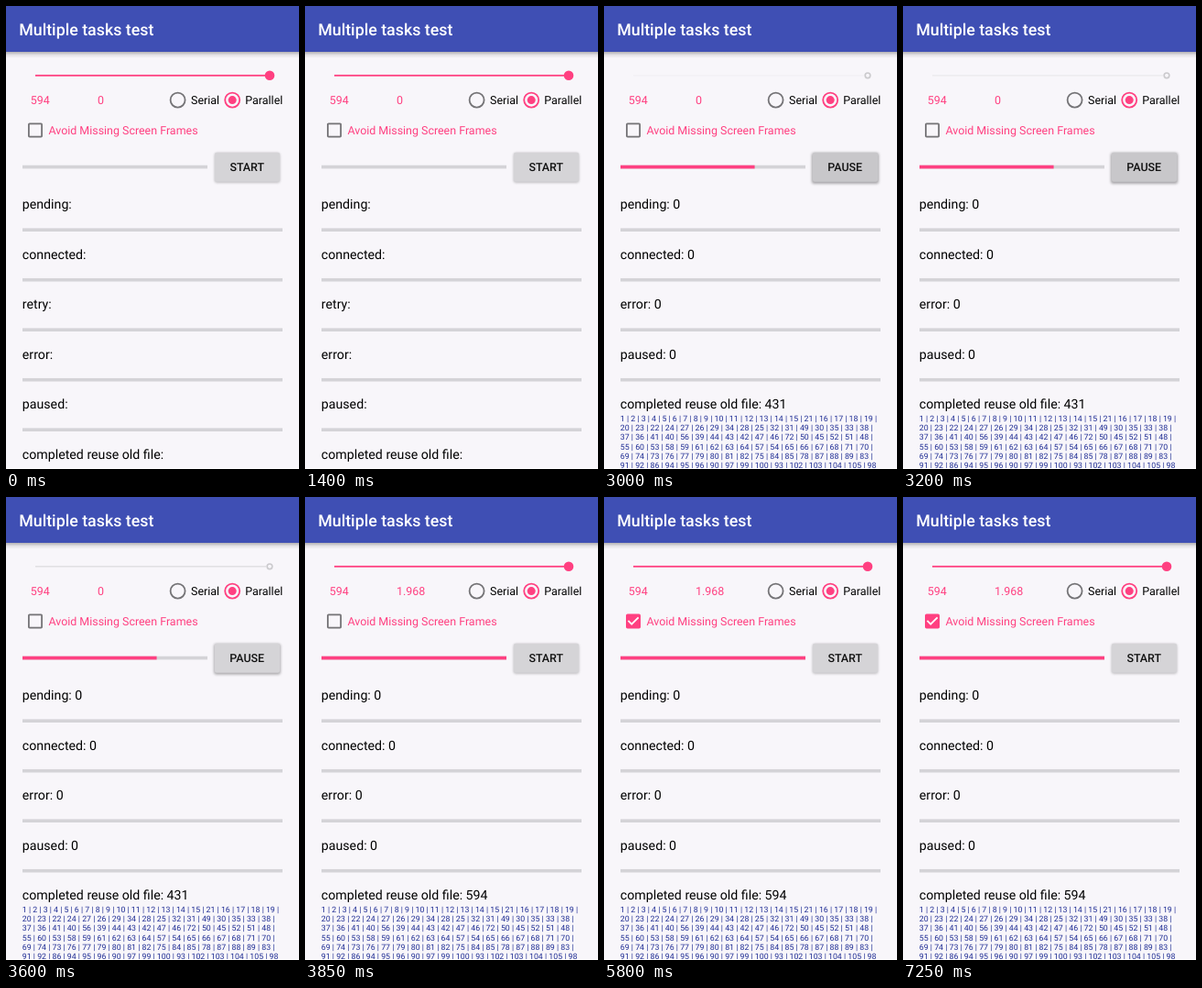
Recreate the animation shown at these times as an HTML page. Size 320 by 505 pixels, loop 8000 ms.

```html
<!DOCTYPE html>
<html lang="en">
<head>
<meta charset="utf-8">
<title>Multiple tasks test</title>
<style>
html, body { margin: 0; width: 100%; height: 100%; overflow: hidden; background: #f8f6fa; }
svg { display: block; width: 100vw; height: 100vh; }
text { font-family: Roboto, sans-serif; white-space: pre; text-rendering: geometricPrecision; }
.label { font-size: 14.2px; }
.small { font-size: 12.44px; }
.pink { fill: #ff4081; }
.list { font-size: 8.77px; fill: #1f2d94; }
.medium { font-weight: 500; }
</style>
</head>
<body>
<svg id="stage" viewBox="0 0 320 505" preserveAspectRatio="none">
  <defs>
    <linearGradient id="fade" x1="0" y1="0" x2="0" y2="1">
      <stop offset="0" stop-color="#000" stop-opacity=".28"/>
      <stop offset=".5" stop-color="#000" stop-opacity=".08"/>
      <stop offset="1" stop-color="#000" stop-opacity="0"/>
    </linearGradient>
    <filter id="blur" x="-20%" y="-30%" width="140%" height="160%"><feGaussianBlur stdDeviation="1.5"/></filter>
  </defs>
  <rect width="320" height="505" fill="#f8f6fa"/>
  <rect y="50" width="320" height="7" fill="url(#fade)"/>
  <rect width="320" height="50" fill="#3f4fb4"/>
  <text class="medium" x="14.2" y="32" font-size="17.8" fill="#fff">Multiple tasks test</text>

  <g id="sliderOn" class="pink">
    <rect x="32" y="74.9" width="256" height="1.8"/>
    <circle cx="288" cy="75.8" r="5.3"/>
  </g>
  <g id="sliderOff">
    <rect id="track" x="32" y="75" width="252" height="1.6" fill="#dcdbde"/>
    <circle cx="288" cy="75.8" r="2.8" fill="#f8f6fa" stroke="#cbcacd" stroke-width="1.7"/>
  </g>

  <text class="small pink" x="26.7" y="107.4">594</text>
  <text id="secs" class="small pink" x="100" y="107.4">0</text>
  <g fill="none" stroke-width="1.8">
    <circle cx="187.6" cy="102.6" r="8" stroke="#757477"/>
    <circle cx="247.2" cy="102.6" r="8" stroke="#ff4081"/>
  </g>
  <circle class="pink" cx="247.2" cy="102.6" r="4.5"/>
  <text class="small" x="202" y="107.4">Serial</text>
  <text class="small" x="261.3" y="107.4">Parallel</text>

  <circle id="ripple" cx="32" cy="135.5" r="0"/>
  <rect id="box" x="24" y="127.5" width="16" height="16" rx="1.8"/>
  <rect id="hole" fill="#f8f6fa"/>
  <path id="tick" d="M26.4 134.9L30.2 138.7L37.6 131.3" fill="none" stroke="#fff" stroke-width="1.8" pathLength="1" stroke-dasharray="1 2"/>
  <text class="small pink" x="46.4" y="139.9">Avoid Missing Screen Frames</text>

  <rect x="18" y="173.7" width="202" height="3.7" fill="#d4d3d7"/>
  <rect id="total" class="pink" x="18" y="173.7" height="3.7"/>

  <rect id="shadow" rx="2" filter="url(#blur)"/>
  <rect id="button" x="228" y="159.7" width="71" height="32" rx="2"/>
  <text id="action" class="small medium" x="263.2" y="180.2" text-anchor="middle" fill="#111"></text>

  <g id="rows"></g>
  <g id="list"></g>
  <rect y="504" width="320" height="1" fill="#fff"/>
</svg>
<script>
const LOOP = 8000;
const PRESS = 2650, REUSED = 3000, DONE = 3850, CHECK = 5100;
const TASKS = 594;
const IDLE = ["pending", "connected", "retry", "error", "paused", "completed reuse old file"];
const BUSY = ["pending", "connected", "error", "paused", "completed reuse old file", "completed width download"];
const LINES = [
  "1 2 3 4 5 6 7 8 9 10 11 12 13 14 15 21 16 17 18 19",
  "20 23 22 24 27 26 29 34 28 25 32 31 49 30 35 33 38",
  "37 36 41 40 56 39 44 43 42 47 46 72 50 45 52 51 48",
  "55 60 53 58 59 61 62 63 64 57 54 65 66 67 68 71 70",
  "69 74 73 76 77 79 80 81 82 75 84 85 78 87 88 89 83",
  "91 92 86 94 95 96 90 97 99 100 93 102 103 104 105 98"
];

const $ = id => document.getElementById(id);
const clamp = x => Math.min(1, Math.max(0, x));
const span = (t, from, to) => clamp((t - from) / (to - from));
const smooth = x => x * x * (3 - 2 * x);

function add(parent, tag, attrs, text = "") {
  const el = document.createElementNS("http://www.w3.org/2000/svg", tag);
  set(el, attrs);
  el.textContent = text;
  parent.appendChild(el);
  return el;
}

function set(el, attrs) {
  for (const key in attrs) el.setAttribute(key, attrs[key]);
}

function show(id, on) {
  $(id).style.display = on ? "" : "none";
}

function write(el, text) {
  if (el.textContent !== text) el.textContent = text;
}

const rows = IDLE.map((_, i) => {
  const y = 221.1 + i * 54.5;
  return {
    label: add($("rows"), "text", { class: "label", x: 17.8, y }),
    bar: add($("rows"), "rect", { x: 18, y: y + 21.3, width: 284, height: 3.6, fill: "#d4d3d7" })
  };
});

LINES.forEach((line, i) => {
  const tail = i < LINES.length - 1 ? " |" : "";
  add($("list"), "text", { class: "list", x: 17.8, y: 452.8 + i * 10.32 }, line.split(" ").join(" | ") + tail);
});

function drawRows(t) {
  const done = t < REUSED ? 0 : t < DONE ? 431 : TASKS;
  const listed = t >= REUSED;
  rows.forEach(({ label, bar }, i) => {
    const count = i === 4 ? done : 0;
    write(label, t < PRESS ? IDLE[i] + ":" : `${BUSY[i]}: ${count}`);
    label.style.display = listed && i > 4 ? "none" : "";
    bar.style.display = listed && i > 3 ? "none" : "";
  });
  show("list", listed);
  set($("total"), { width: 202 * done / TASKS });
}

function drawControls(t) {
  const running = t >= PRESS && t < DONE;
  show("sliderOn", !running);
  show("sliderOff", running);
  set($("track"), { opacity: 0.2 + 0.6 * span(t, REUSED, 3600) });
  write($("secs"), t < DONE ? "0" : "1.968");
  write($("action"), running ? "PAUSE" : "START");

  const press = running ? 1 - smooth(span(t, 3200, 3650)) : 0;
  const lift = running ? 1 - 0.5 * span(t, 3400, 3800) : 0;
  const tone = 213 - 13 * press;
  set($("button"), { fill: `rgb(${tone},${tone - 1},${tone + 2})` });
  set($("shadow"), {
    x: 228 - lift, y: 160.5 - 0.3 * lift,
    width: 71 + 2 * lift, height: 32 + 1.6 * lift,
    opacity: 0.28 + 0.06 * lift
  });
}

function drawCheck(t) {
  const on = t >= CHECK;
  const size = 12.4 * (1 - smooth(span(t, CHECK + 50, CHECK + 250)));
  set($("box"), { fill: on ? "#ff4081" : "#757477" });
  set($("hole"), { x: 32 - size / 2, y: 135.5 - size / 2, width: size, height: size });

  const drawn = smooth(span(t, CHECK + 250, CHECK + 500));
  show("tick", drawn > 0);
  set($("tick"), { "stroke-dashoffset": 1 - drawn });

  const grow = span(t, CHECK, CHECK + 350);
  const fade = 1 - span(t, CHECK + 300, CHECK + 700);
  set($("ripple"), { r: 18 * smooth(grow), opacity: on ? 0.1 * fade : 0 });
}

const start = performance.now();

function frame() {
  const t = (performance.now() - start) % LOOP;
  drawRows(t);
  drawControls(t);
  drawCheck(t);
  requestAnimationFrame(frame);
}
frame();
</script>
</body>
</html>
```
